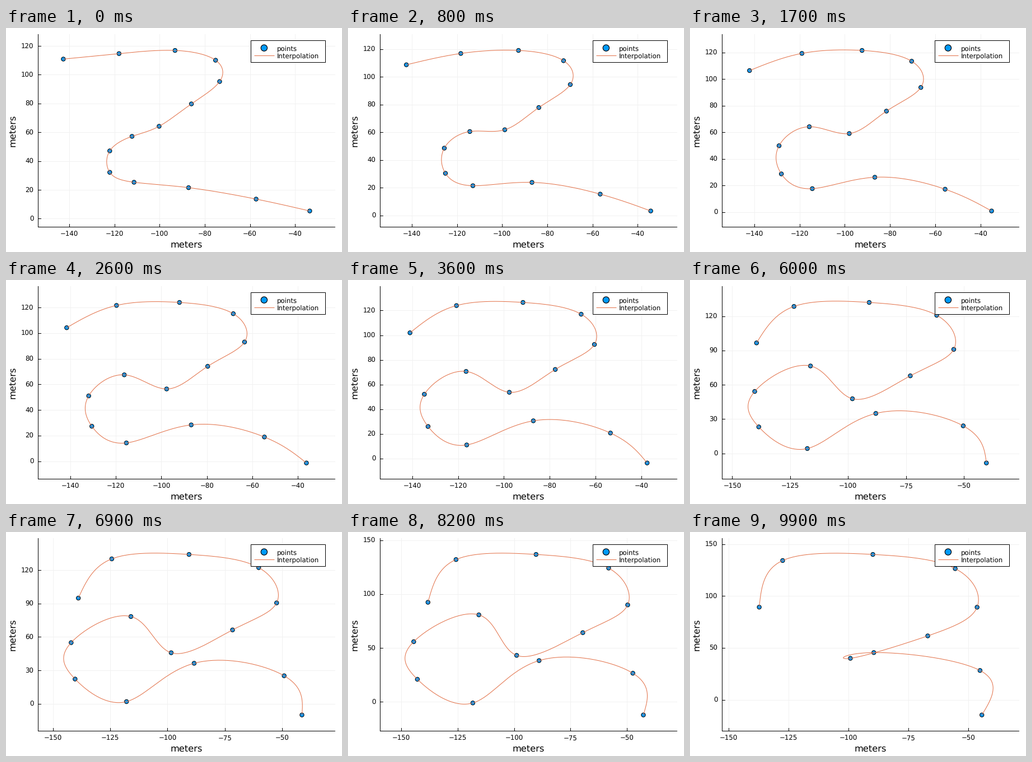
Write a matplotlib script that moves like this. It is 600 px wide and 400 px high and loops after 10000 ms.

```python
import numpy as np
import matplotlib.pyplot as plt
from matplotlib.animation import FuncAnimation
from matplotlib.patches import Circle, Rectangle

W, H, DPI = 600, 400, 100
PX = 72 / DPI                      # one pixel in points
LEFT, RIGHT, TOP, BOTTOM = 58, 588, 12, 356
SHIFT = 0.6                        # keeps thin strokes on whole pixels
FRAMES = 100
RATE, NECK = 7.25, 10.2            # migration rate, cutoff distance in metres
BLUE, ORANGE = "#009afa", "#e26f46"

# River nodes in metres; the first and last are hidden fixed anchors
START = np.array([
    (-170, 111.5),
    (-142.6, 110.9), (-117.95, 114.7), (-93.15, 116.9), (-75.2, 110.1),
    (-73.4, 95.3), (-85.9, 79.75), (-100.2, 64.2), (-112.2, 57.2),
    (-122.05, 47.1), (-122.05, 32.2), (-111.3, 25.3), (-87.15, 21.55),
    (-57.25, 13.6), (-33.5, 5.35),
    (-6, -3),
])


def migrate(p):
    """Push each node to the outside of its bend, faster on steep reaches."""
    step = np.diff(p, axis=0)
    a, b = step[:-1], step[1:]
    la, lb = (np.hypot(*v.T)[:, None] for v in (a, b))
    tx, ty = (a / la**2 + b / lb**2).T       # tangent of the circle through 3 nodes
    left = np.c_[-ty, tx] / np.hypot(tx, ty)[:, None]
    turn = np.sign(a[:, 0] * b[:, 1] - a[:, 1] * b[:, 0])[:, None]
    q = p.copy()
    q[1:-1] -= RATE * turn * left / la
    return q


def cut_necks(p):
    """Drop the loop between two bends that have met."""
    last = len(p) - 2
    for i in range(1, last):
        for j in range(last, i + 1, -1):
            if np.hypot(*(p[i] - p[j])) < NECK:
                return np.delete(p, range(i + 1, j), axis=0)
    return p


def history():
    p, states = START, []
    for _ in range(FRAMES):
        states.append(p[1:-1])
        p = cut_necks(migrate(p))
    return states


def spline(p, n=40):
    """Natural cubic spline with uniform parameter."""
    k = len(p)
    a = 4 * np.eye(k) + np.eye(k, k=1) + np.eye(k, k=-1)
    a[[0, -1]] = np.eye(k)[[0, -1]]
    d = np.zeros_like(p)
    d[1:-1] = 6 * np.diff(p, n=2, axis=0)
    m = np.linalg.solve(a, d)
    u = np.linspace(0, k - 1, (k - 1) * n + 1)
    i = np.minimum(u.astype(int), k - 2)
    s = (u - i)[:, None]
    r = 1 - s
    return r * p[i] + s * p[i + 1] + ((r**3 - r) * m[i] + (s**3 - s) * m[i + 1]) / 6


def ticks(lo, hi, step):
    return np.arange(np.ceil(lo / step), np.floor(hi / step) + 1) * step


def segments(starts, ends):
    """Separate strokes as one line with gaps."""
    gap = np.full_like(starts, np.nan)
    return np.stack([starts, ends, gap], axis=1).reshape(-1, 2).T


plt.rcParams.update({"font.family": "DejaVu Sans", "text.hinting": "none"})
fig = plt.figure(figsize=(W / DPI, H / DPI), dpi=DPI, facecolor="white")
ax = fig.add_axes([0, 0, 1, 1])
ax.set_xlim(SHIFT, W + SHIFT)
ax.set_ylim(H + SHIFT, SHIFT)
ax.axis("off")


def stroke(x, y, color="black", z=1, **kw):
    return ax.plot(x, y, color=color, lw=PX, zorder=z, **kw)[0]


def dot(x, y, r, edge, z):
    return ax.add_patch(Circle((x, y), r, fc=BLUE, ec="black", lw=edge * PX, zorder=z))


def text(x, y, s="", size=11.8, **kw):
    return ax.text(x, y, s, fontsize=size * PX, va="baseline", **kw)


grid = stroke([], [], alpha=0.055, z=0)
marks = stroke([], [], z=2)
stroke([LEFT, LEFT], [TOP, BOTTOM], z=2, solid_capstyle="projecting")
stroke([LEFT, RIGHT], [BOTTOM, BOTTOM], z=2, solid_capstyle="projecting")
dots = [dot(0, 0, 3.65, 1, 3) for _ in START[1:-1]]
curve = stroke([], [], ORANGE, 4, solid_joinstyle="round")
x_labels = [text(0, 372.2, ha="center") for _ in range(9)]
y_labels = [text(50, 0, ha="right") for _ in range(9)]
text(323, 392.3, "meters", 16.3, ha="center")
text(17, 183.8, "meters", 16.3, ha="center", rotation=90, rotation_mode="anchor")

ax.add_patch(Rectangle((438, 23), 133, 39, fc="white", ec="black", lw=PX, zorder=5))
dot(461.5, 36.2, 5.65, 1.2, 6)
stroke([444, 480], [49.5, 49.5], ORANGE, 6, solid_capstyle="butt")
text(484.5, 41, "points", zorder=6)
text(484.5, 54, "Interpolation", zorder=6)

STATES = history()


def update(frame):
    p = STATES[frame]
    lo, hi = p.min(axis=0), p.max(axis=0)
    pad = 0.1 * (hi - lo).max()
    lo, hi = lo - pad, hi + pad
    origin = np.array([LEFT, BOTTOM])
    scale = np.array([RIGHT - LEFT, TOP - BOTTOM]) / (hi - lo)

    for k, c in enumerate(dots):
        c.set_visible(k < len(p))
        if k < len(p):
            c.center = origin + (p[k] - lo) * scale
    curve.set_data(*(origin + (spline(p) - lo) * scale).T)

    xt = ticks(lo[0], hi[0], 20 if hi[0] > -25 else 25)
    yt = ticks(lo[1], hi[1], 20 if hi[1] < 140 else 30 if hi[1] < 150 else 50)
    xs = LEFT + (xt - lo[0]) * scale[0]
    ys = BOTTOM + (yt - lo[1]) * scale[1]

    base = np.vstack([np.c_[xs, np.full(len(xs), BOTTOM)],
                      np.c_[np.full(len(ys), LEFT), ys]]).astype(float)
    across = np.vstack([np.tile([0, 1], (len(xs), 1)), np.tile([1, 0], (len(ys), 1))])
    marks.set_data(*segments(base, base + across * [5, -5]))
    grid.set_data(*segments(base, base + across * [RIGHT - LEFT, TOP - BOTTOM]))

    for t in x_labels + y_labels:
        t.set_text("")
    for t, v, x in zip(x_labels, xt, xs):
        t.set_text(f"{v:.0f}".replace("-", "\u2212"))
        t.set_x(x)
    for t, v, y in zip(y_labels, yt, ys):
        t.set_text(f"{abs(v):.0f}")
        t.set_y(y + 4.3)
    return []


anim = FuncAnimation(fig, update, frames=FRAMES, interval=100, repeat=True)
plt.show()
```
